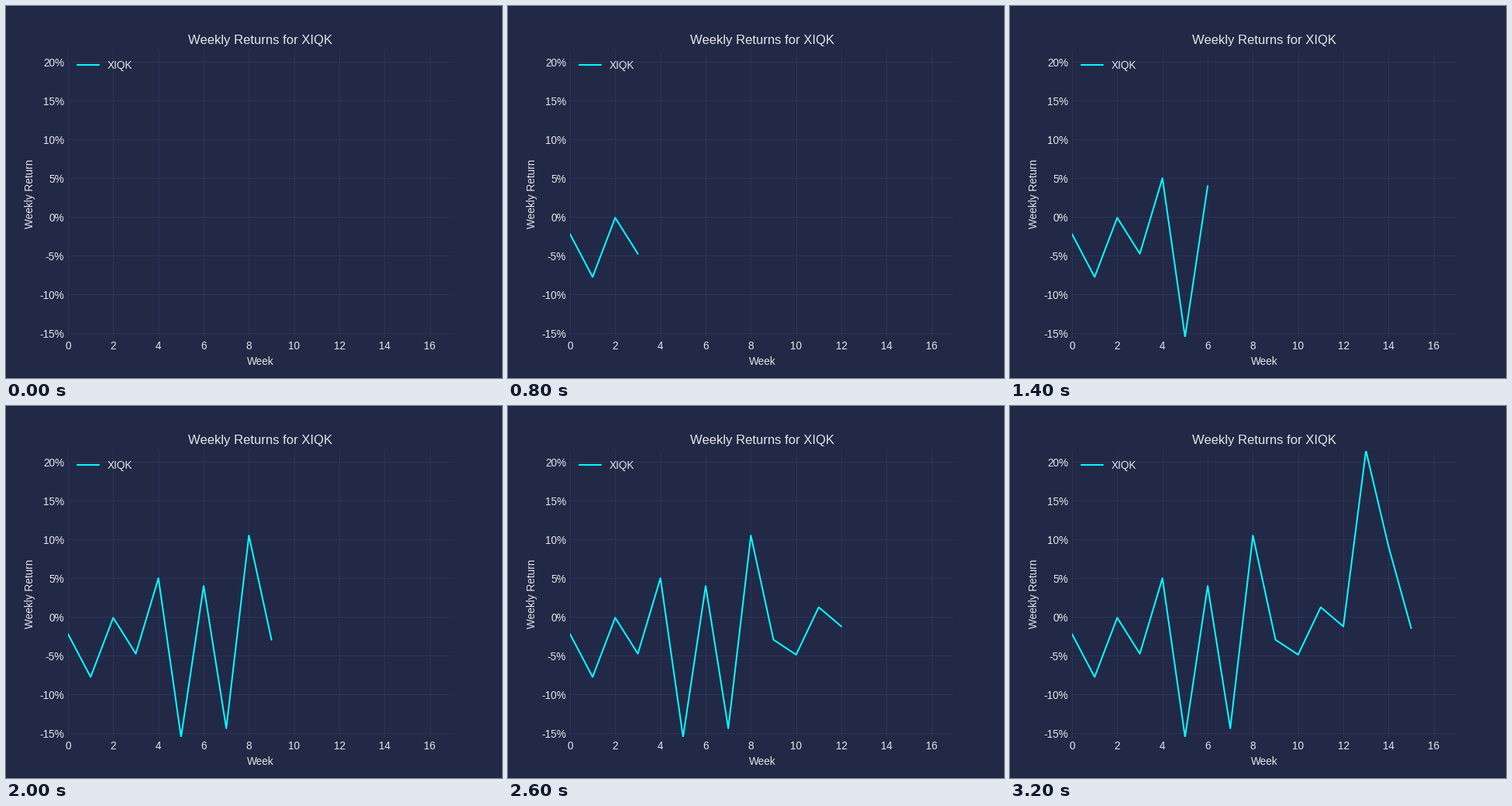
Recreate the animation shown at these times as a matplotlib script. Size 640 by 480 pixels, loop 3.4 s.

```python
import matplotlib.pyplot as plt
from matplotlib.animation import FuncAnimation
from matplotlib.ticker import MultipleLocator, PercentFormatter

BG, GRID, TEXT, CYAN = "#212946", "#2A3459", "0.9", "#08F7FE"
TICKER = "XIQK"
FRAMES, INTERVAL = 17, 200

returns = [-2.2, -7.75, -0.1, -4.75, 5.0, -15.5, 4.0, -14.37,
           10.5, -2.95, -4.87, 1.25, -1.23, 21.45, 9.07, -1.46]

plt.rcParams.update({
    "font.family": "Liberation Sans",
    "font.size": 9.8,  # just under 10 so hinting keeps a 7 px x-height
    "axes.titlesize": 12,
    "axes.unicode_minus": False,
    "text.color": TEXT,
    "axes.labelcolor": TEXT,
    "xtick.color": TEXT,
    "ytick.color": TEXT,
    "xtick.major.size": 0,
    "ytick.major.size": 0,
    "axes.facecolor": BG,
    "figure.facecolor": BG,
    "savefig.facecolor": BG,
    "axes.axisbelow": True,
    "lines.solid_capstyle": "round",
    "legend.frameon": False,
    "legend.handlelength": 2.05,
})

fig, ax = plt.subplots(figsize=(6.4, 4.8), dpi=100)
ax.set_xlim(0, FRAMES)
ax.set_ylim(min(returns), max(returns))
ax.xaxis.set_major_locator(MultipleLocator(2))
ax.yaxis.set_major_locator(MultipleLocator(5))
ax.yaxis.set_major_formatter(PercentFormatter(decimals=0))
ax.grid(color=GRID, linewidth=0.8)
ax.spines[:].set_visible(False)
ax.set_title(f"Weekly Returns for {TICKER}")
ax.set_xlabel("Week")
ax.set_ylabel("Weekly Return")

line, = ax.plot([], [], color=CYAN, linewidth=1.5, label=TICKER)
ax.legend(loc="upper left")


def update(week):
    # A single point has no segment, so the line first shows with two
    shown = returns[:week] if week > 1 else []
    line.set_data(range(len(shown)), shown)
    return line,


anim = FuncAnimation(fig, update, frames=FRAMES, interval=INTERVAL,
                     repeat=True, repeat_delay=0)
plt.show()
```
